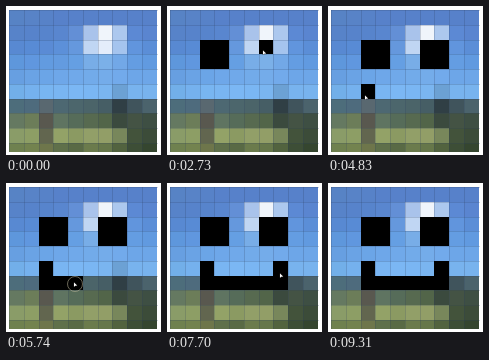
Write an HTML page with a canvas that moves like this. It is 155 px wide and 149 px high and loops after 9380 ms.

```html
<!DOCTYPE html>
<html>
<head>
<meta charset="utf-8">
<title>Painting a smile on a mosaic</title>
<style>
  html, body { margin: 0; width: 155px; height: 149px; overflow: hidden; background: #fff; }
  canvas { display: block; }
</style>
</head>
<body>
<canvas width="155" height="149"></canvas>
<script>
const ctx = document.querySelector('canvas').getContext('2d');
const LOOP = 9380, STEP = 70;
const LEFT = 3, TOP = 4, RIGHT = 152, BOTTOM = 146, CELL = 14.75;

// Each row's colours from left to right; the last one repeats to the edge.
const rows = [
  '#5783c5 #5883c7 #5782c8 #5781ca',
  '#5783c9 #5783cb #5784cc #5986cf #638fd6 #a9c3eb #f0f5fb #acc8ee #5c89d4 #5a85d0',
  '#5889d2 #588bd5 #5a8bd5 #5c90d9 #6598dd #c0d6f3 #e4edfb #a5c4ee #6195dd #5b8ed7',
  '#5e97dc #6097df #629be0 #639be0 #659fe3 #78ade7 #7bb0e8 #72a8e7 #649de2 #619ae0',
  '#679fe1 #6aa3e5 #6ba5e7 #6ea7e9 #70a9ea #72abea #74acea #72aaeb #6da6e8',
  '#72afe9 #75b1ee #78b5f1 #79b5f2 #7bb7f4 #7ab6f3 #7ab5f0 #6ca1d4 #78b3ee',
  '#4d6d7b #4e6b7d #596870 #4d6872 #4c666c #4b6469 #465e65 #303f45 #40545c #4b636c',
  '#657961 #6c7d59 #59584f #5f7461 #566c59 #576a50 #526549 #3b4a3e #445344 #3e4f43',
  '#8a9c68 #8d9e65 #62664f #93a267 #8b9a62 #929f68 #929e67 #78875b #43533b #3c4c39',
  '#6f814f #73834f #6e764b #5f704a #596a45 #6b7b4c #66774a #52633f #3d4e36 #35462f'
].map(row => row.split(' '));

// Time, x and y of each click; a click blackens the cell under it.
const clicks = [
  [950, 41, 42], [1330, 45, 53], [1700, 54, 56], [2050, 54, 42],
  [2500, 97, 46], [3080, 99, 56], [3430, 113, 56], [3850, 113, 42],
  [4700, 38, 91], [5080, 40, 101], [5400, 55, 101], [5700, 69, 101],
  [5970, 84, 101], [6250, 98, 101], [6580, 108, 101], [7200, 114, 92]
];
const stops = [[0, 165, 155], ...clicks, [7700, 114, 92], [8600, 165, 155]];

function fillCell(col, row, color) {
  const x = Math.round(LEFT + col * CELL), y = Math.round(TOP + row * CELL);
  const right = Math.min(Math.round(LEFT + (col + 1) * CELL), RIGHT);
  const bottom = Math.min(Math.round(TOP + (row + 1) * CELL), BOTTOM);
  ctx.fillStyle = color;
  ctx.fillRect(x, y, right - x, bottom - y);
}

function drawGrid() {
  ctx.fillStyle = 'rgba(45, 65, 95, .22)';
  for (let i = 0; i < 10; i++) {
    const offset = Math.round(i * CELL);
    ctx.fillRect(LEFT + offset, TOP, 1, BOTTOM - TOP);
    ctx.fillRect(LEFT, TOP + offset, RIGHT - LEFT, 1);
  }
}

function cursorAt(t) {
  const next = stops.findIndex(stop => stop[0] > t);
  if (next < 1) return stops.at(-1).slice(1);
  const [start, x0, y0] = stops[next - 1], [end, x1, y1] = stops[next];
  const p = Math.max(0, Math.min(1, ((t - start) / (end - start) - .4) / .4));
  const ease = p * p * (3 - 2 * p);
  return [x0 + (x1 - x0) * ease, y0 + (y1 - y0) * ease];
}

function drawCursor(t) {
  const [x, y] = cursorAt(t);
  if (clicks.some(([time]) => t > time - 90 && t < time + 110)) {
    ctx.strokeStyle = 'rgba(190, 185, 155, .55)';
    ctx.lineWidth = 1;
    ctx.beginPath();
    ctx.arc(x, y, 7.5, 0, Math.PI * 2);
    ctx.stroke();
  }
  ctx.beginPath();
  ctx.moveTo(x - 1, y - 1.5);
  ctx.lineTo(x - 1, y + 2.7);
  ctx.lineTo(x + .3, y + 1.8);
  ctx.lineTo(x + 2.2, y + 1.6);
  ctx.closePath();
  ctx.strokeStyle = '#222';
  ctx.lineWidth = .8;
  ctx.stroke();
  ctx.fillStyle = '#fff';
  ctx.fill();
}

function draw(now) {
  const t = Math.floor(now % LOOP / STEP) * STEP;
  ctx.fillStyle = '#fff';
  ctx.fillRect(0, 0, 155, 149);
  rows.forEach((colors, row) => {
    for (let col = 0; col < 10; col++) fillCell(col, row, colors[col] || colors.at(-1));
  });
  drawGrid();
  for (const [time, x, y] of clicks) {
    if (t >= time) fillCell(Math.floor((x - LEFT) / CELL), Math.floor((y - TOP) / CELL), '#000');
  }
  drawCursor(t);
  requestAnimationFrame(draw);
}
requestAnimationFrame(draw);
</script>
</body>
</html>
```
